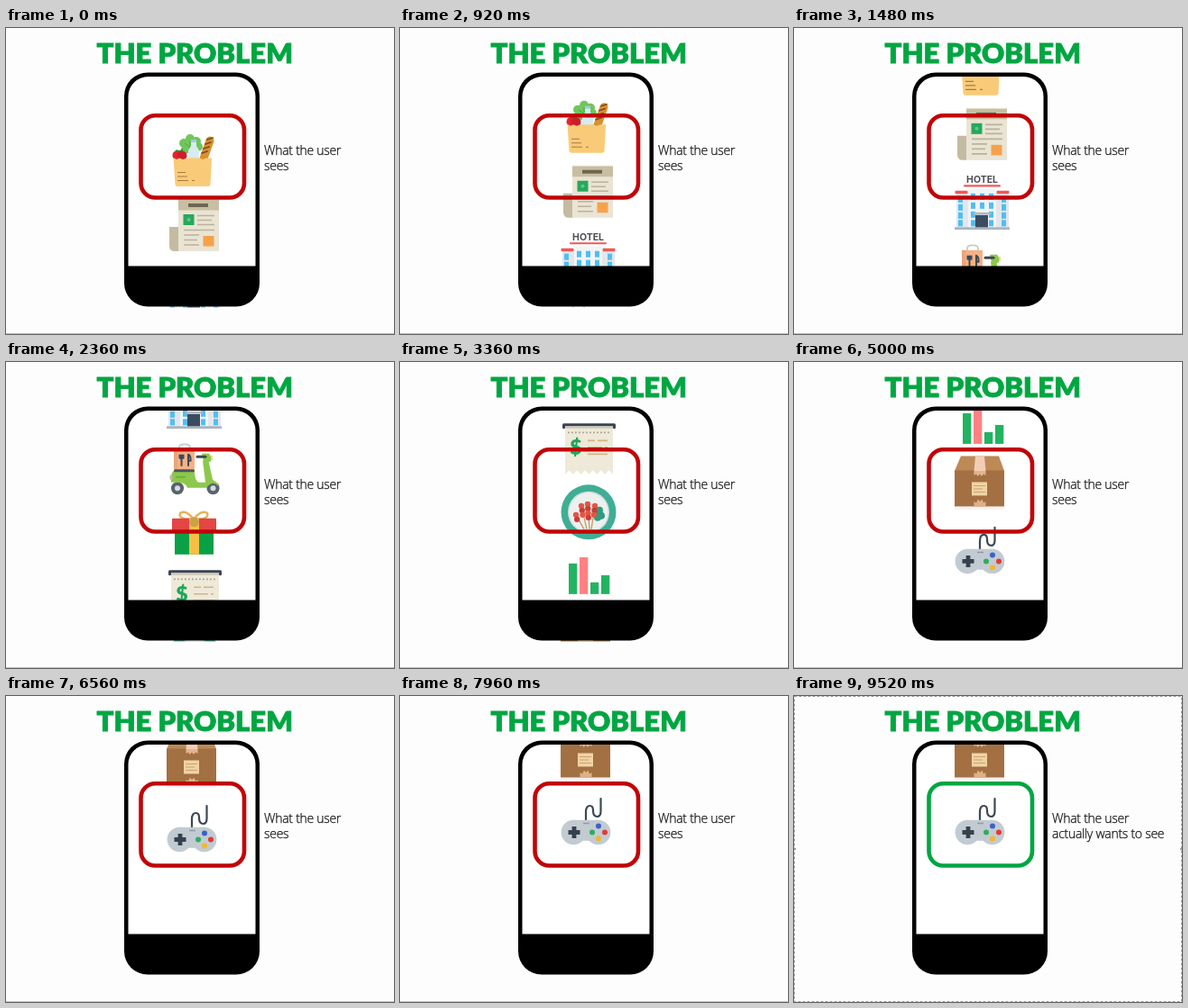
Animation, 430 px wide and 340 px high, one loop 9.56 s. Source, as an HTML page:

```html
<!DOCTYPE html>
<html lang="en">
<head>
<meta charset="utf-8">
<title>The problem</title>
<style>
html, body { margin: 0; width: 100%; height: 100%; overflow: hidden; background: #fdfdfd; }
svg { display: block; width: 430px; height: 340px; }
.title { font: 900 31px Lato, sans-serif; fill: #00a642; stroke: #00a642; stroke-width: .9px; }
.note { font: 300 14px "Open Sans", "Noto Sans", sans-serif; letter-spacing: -.27px; fill: #111; stroke: #111; stroke-width: .25px; }
</style>
</head>
<body>
<svg id="stage" viewBox="0 0 430 340">
  <defs><clipPath id="view"><rect x="131" y="52" width="150" height="258.5"/></clipPath></defs>
  <rect width="430" height="340" fill="#fdfdfd"/>
  <rect x="133" y="52" width="146" height="255" rx="25" fill="#fff"/>
  <g clip-path="url(#view)"><g id="feed"></g></g>
  <path fill-rule="evenodd" d="M157 49.500H255A26 26 0 0 1 281 75.500V283.500A26 26 0 0 1 255 309.500H157A26 26 0 0 1 131 283.500V75.500A26 26 0 0 1 157 49.500Z
    M157.500 54A22 22 0 0 0 135.500 76V264.500H276.500V76A22 22 0 0 0 254.500 54Z"/>
  <rect id="focus" x="149.500" y="97.300" width="114.500" height="91.200" rx="16" fill="none" stroke-width="4.600"/>
  <text class="title" x="100.500" y="39">THE PROBLEM</text>
  <text class="note" x="286" y="141">What the user</text>
  <text class="note" x="286" y="158" id="wish"></text>
  <path id="rule" d="M0 339.500H430" stroke="#c4c4c4"/>
  <g id="edge" fill="none" stroke="#9a9a9a">
    <rect x=".5" y=".5" width="429" height="339" stroke-dasharray="3 2"/>
    <path d="M0 170H2M428 170H430" stroke-width="2"/>
  </g>
</svg>
<script>
const LOOP = 9560, SWITCH = 8180, EDGE = 9480;
const $ = id => document.getElementById(id);

const rect = (x, y, w, h, fill, r = 0) => `<rect x="${x}" y="${y}" width="${w}" height="${h}" rx="${r}" fill="${fill}"/>`;
const dot = (x, y, r, fill) => `<circle cx="${x}" cy="${y}" r="${r}" fill="${fill}"/>`;
const shape = (d, fill) => `<path d="${d}" fill="${fill}"/>`;
const line = (d, color, w = 1, cap = 'butt') =>
  `<path d="${d}" fill="none" stroke="${color}" stroke-width="${w}" stroke-linecap="${cap}" stroke-linejoin="round"/>`;
const each = (list, fn) => list.map(fn).join('');

function groceries() {
  return each([[197, 128], [204, 123], [211, 126], [213, 132], [204, 132], [199, 135]], ([x, y]) => dot(x, y, 5, '#70c65a'))
    + line('M204 138V126M204 133L198 128M204 133L210 128', '#4fa944')
    + line('M219 145L226 125', '#d9902f', 9, 'round')
    + line('M217 139l6-2M219 134l6-2M221 129l6-2M223 124l6-2', '#7d4a1d', 1.8, 'round')
    + shape('M205 126H211V131L214 136V148H202V136L205 131Z', '#d7ebf3') + rect(205, 124, 6, 3, '#a6cbdc')
    + dot(190, 141.500, 5.500, '#e32430') + dot(195, 142, 5.500, '#cf1c2b') + line('M188 136l5 1 3-2', '#37803a', 1.600)
    + shape('M185.500 144L189 146 192 144.500 196 146 200 144.500H214L218 146 222 144.500 228 144.500 226.500 174Q226 176 224 176H190Q188 176 187.500 174Z', '#f9cb78')
    + line('M190 160.500h9M190 165h11M190 169.500h12M206 169.500h3', '#a87b42', 1.100);
}

function news() {
  return shape('M181 221H192V248H187Q181 248 181 242Z', '#c3bba2')
    + rect(191, 190, 45, 58, '#e9e4d4') + rect(191, 191, 45, 11.500, '#c8bea1') + rect(202, 195, 22, 4, '#6e6552')
    + rect(196.500, 207, 12, 12, '#27a85b') + dot(202.500, 213, 2, '#62c78a')
    + line('M212 208.500H231M212 213.500H228M212 218.500H231M197 224.500H231M197 230H214M197 235.500H212M197 241H214', '#bcb299', 1.600)
    + rect(218.500, 231, 12, 11.500, '#f7a14a');
}

function hotel() {
  const panes = (xs, ys, w) => each(xs, x => each(ys, y => rect(x, y, w, 7, '#50bff0')));
  return '<text x="208.500" y="172" text-anchor="middle" font-family="Inter, sans-serif" font-weight="700" font-size="10.500" fill="#4c4c55">HOTEL</text>'
    + line('M189 175.500H228', '#ee5a58', 2.200, 'round')
    + rect(180, 184, 58, 38, '#e3e7ec') + rect(193, 179, 31, 43, '#f2f4f6')
    + rect(178.500, 181, 14, 3.500, '#ee5a58', 1) + rect(224.500, 181, 14, 3.500, '#ee5a58', 1)
    + panes([182, 230], [187, 196, 205, 213.500], 5)
    + panes([196, 216], [184, 194, 204, 213.500], 5) + panes([206], [184, 194], 5)
    + rect(199, 205, 19, 2.500, '#aeb9c6') + rect(201, 208, 14, 14, '#3d4b60') + rect(178, 221.500, 61, 2.800, '#a9b4c1');
}

function scooter() {
  return line('M192 99V95Q192 91.500 198 91.500Q204 91.500 204 95V99', '#c8ccce', 1.800)
    + rect(186, 97, 23, 23, '#f4b184') + rect(186, 97, 4, 23, '#e8a67c')
    + line('M194.500 103V116M192.500 103V107H196.500V103M202 116V103Q205 104 204.500 110H202', '#3c4858', 2)
    + dot(190, 140.500, 7, '#59636e') + dot(190, 140.500, 3, '#d6dce0')
    + dot(229.500, 140.500, 7, '#59636e') + dot(229.500, 140.500, 3, '#d6dce0')
    + shape('M185 121.500H209Q209 133 214 134H221L218 110 224 108 229 131 236 136 235 138Q229 131 222 140H201Q199 134 191 134H183Q182 126 185 121.500Z', '#8cc84b')
    + shape('M217 102H225Q228 105 227 111H219Z', '#8cc84b') + rect(227, 104, 2, 5, '#f7d66a')
    + line('M212 105.500H221', '#3f4852', 3, 'round') + rect(186, 119.500, 23, 3, '#4b545f', 1.500)
    + rect(181.500, 126, 3, 5, '#c7b4b4', 1) + rect(188, 127, 11, 2, '#6fae34', 1);
}

function gift() {
  return line('M207 175Q190 175 193 168Q200 164 208 175Q216 164 223 168Q226 175 209 175', '#e5b457', 2.400)
    + rect(187, 187, 43, 27, '#0aa146') + rect(187, 187, 43, 3, '#0a853b')
    + rect(184, 174, 49, 13.500, '#e34643', 1) + rect(203, 174, 11, 40, '#f4bf45')
    + dot(208.500, 178, 5.500, '#cda04a');
}

function receipt() {
  let teeth = '';
  for (let x = 236; x > 184; x -= 8.833) teeth += `L${x} 125L${x - 4.417} 120.500`;
  return shape(`M183 71H236${teeth}L183 125Z`, '#eee9d8') + rect(183, 72, 53, 2, '#d0cab8')
    + line('M181.500 73V70H237.500V73', '#3a4356', 3, 'round')
    + '<path d="M186 78.500H234" stroke="#a8a291" stroke-width="1.800" stroke-dasharray="1.800 2.200"/>'
    + '<text x="195" y="103" text-anchor="middle" font-family="Lato, sans-serif" font-weight="900" font-size="23" fill="#1fa65a">$</text>'
    + line('M208 87.500H216M219 87.500H230M208 95H224M227 95H230M208 102.500H230', '#d6b383', 1.600);
}

function plate() {
  const skewer = ([x, y, n, foot]) => line(`M${x} ${y}L${foot} 186`, '#c89a64', 1.300)
    + each([...Array(n).keys()], i => dot(x + (foot - x) * i * .13, y + i * 5, 3.200, i % 2 ? '#c83e35' : '#e25645'));
  return dot(209, 167, 30.500, '#3fae94') + dot(209, 167, 23, '#d5dee0') + dot(209, 167, 21.500, '#edf0ef')
    + each([[217, 169], [221, 165], [223, 171], [219, 173]], ([x, y]) => dot(x, y, 4, '#2e9c80'))
    + each([[195, 170, 2, 204], [201, 160, 3, 207], [208, 158, 4, 210], [216, 160, 3, 212]], skewer);
}

function chart() {
  return each([[187, 224, '#22b461'], [199, 217, '#ff8182'], [211, 245, '#22b461'], [223, 237, '#22b461']],
    ([x, y, c]) => rect(x, y, 9.300, 258 - y, c));
}

function parcel() {
  return rect(178, 158, 55, 6, '#f6f3f3')
    + shape('M185 104.500H227L233 121H178Z', '#bd8957') + rect(178, 120.500, 55, 40, '#a27042')
    + shape('M201 104.500H211L212.500 121H199.500Z', '#f2cdb5')
    + shape('M199.500 121H212.500V126L210 124.500 208 127 206 124.500 203.500 127 202 124.500 199.500 126Z', '#e3b58f')
    + rect(197, 133.500, 17, 15, '#f1d3a5') + line('M199 137.500H212M199 141H209M199 144.500H212', '#c9a273', 1.100)
    + shape('M199.500 160.500V155L202 156.500 204 152.500 206 155 208.500 152.500 210 156.500 212.500 155V160.500Z', '#dfb188');
}

function gamepad() {
  return line('M206 208V199Q206 192 210.500 192Q214 192 214 197Q214 204 218.500 204Q222.500 204 222.500 198V184', '#3c4853', 2.200, 'round')
    + dot(192.300, 221.500, 13.700, '#c2cbd2') + dot(219.700, 221.500, 13.700, '#c2cbd2') + rect(192, 207.800, 28, 23, '#c2cbd2')
    + line('M203 211.500H210', '#8f9ba4', 1.500)
    + line('M186.500 221.500H199.500M193 215V228', '#35424d', 4.800)
    + dot(220, 214.500, 3, '#3c62c9') + dot(213, 221.500, 3, '#2fae59')
    + dot(227, 221.500, 3, '#e23b36') + dot(220, 228.500, 3, '#f2b72e');
}

const items = [[groceries, 0], [news, 0], [hotel, 101], [scooter, 251], [gift, 251], [receipt, 414],
  [plate, 414], [chart, 414], [parcel, 581], [gamepad, 581]];
$('feed').innerHTML = each(items, ([draw, y]) => `<g transform="translate(0 ${y})">${draw()}</g>`);

// time in ms, distance in px, speed in px per ms
const path = [[0, 0, 0], [1480, 101, .145], [2360, 251, .182], [3360, 414, .142],
  [5000, 581, .06], [6560, 643, .018], [7450, 651, 0]];

function scroll(t) {
  const i = path.findIndex(p => p[0] > t);
  if (i < 0) return 651;
  const [t0, y0, v0] = path[i - 1], [t1, y1, v1] = path[i];
  const d = t1 - t0, u = (t - t0) / d, w = 1 - u;
  return w * w * (y0 * (1 + 2 * u) + v0 * d * u) + u * u * (y1 * (3 - 2 * u) - v1 * d * w);
}

function render(t) {
  const done = t >= SWITCH, edge = t >= EDGE;
  $('feed').setAttribute('transform', `translate(0 ${-scroll(t).toFixed(2)})`);
  $('focus').setAttribute('stroke', done ? '#00a642' : '#c00508');
  $('wish').textContent = done ? 'actually wants to see' : 'sees';
  $('edge').style.display = edge ? '' : 'none';
  $('rule').style.display = edge ? 'none' : '';
}

const start = performance.now();
function tick() {
  render((performance.now() - start) % LOOP);
  requestAnimationFrame(tick);
}
render(0);
requestAnimationFrame(tick);
</script>
</body>
</html>
```
